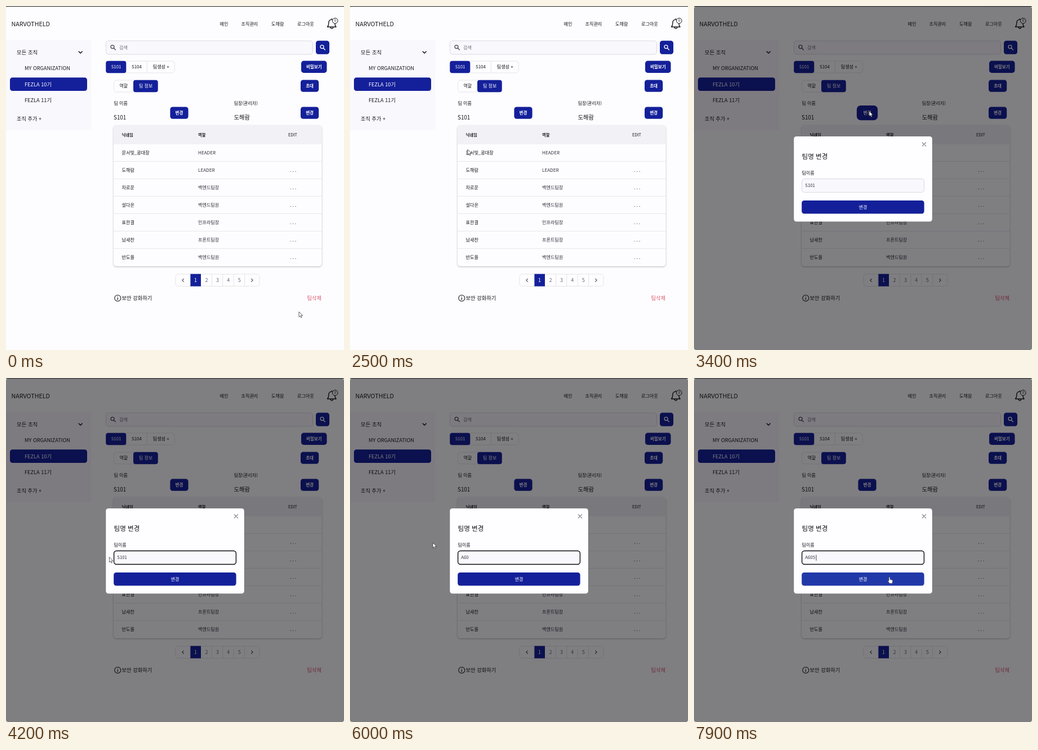
These frames come from a looping animation (600x612 px, 8000 ms). An HTML page:

```html
<!DOCTYPE html>
<html lang="ko">
<head>
<meta charset="utf-8">
<style>
html, body { margin: 0; width: 100%; height: 100%; overflow: hidden; background: #fdfdff; }
svg { display: block; width: 600px; height: 612px; font-family: "Noto Sans CJK KR", "Noto Sans KR", "Noto Sans", sans-serif; }
text { white-space: pre; }
</style>
</head>
<body>
<svg id="stage" viewBox="0 0 600 612"></svg>
<script>
const BLUE = '#14209a', HOVER = '#2139a8', INK = '#17171d', GRAY = '#6b6d7a', EDGE = '#e3e2e9';
const LOOP = 8000;

const text = (x, y, s, size = 8.1, fill = INK, extra = '') =>
  `<text x="${x}" y="${y}" font-size="${size}" fill="${fill}" ${extra}>${s}</text>`;
const mid = (x, y, s, size, fill, weight = 400) =>
  text(x, y, s, size, fill, `text-anchor="middle" font-weight="${weight}"`);
const box = (x, y, w, h, r, fill, extra = '') =>
  `<rect x="${x}" y="${y}" width="${w}" height="${h}" rx="${r}" fill="${fill}" ${extra}/>`;
const line = (d, color = INK, width = 1, extra = '') =>
  `<path d="${d}" fill="none" stroke="${color}" stroke-width="${width}" stroke-linecap="round" stroke-linejoin="round" ${extra}/>`;
const frame = (x, y, w, h, fill = 'none', color = EDGE) =>
  box(x, y, w, h, 4.5, fill, `stroke="${color}" stroke-width=".9"`);
const button = (x, y, w, s, extra = '') =>
  box(x, y, w, 21.3, 4.5, BLUE, extra) + mid(x + w / 2, y + 13.4, s, 7.5, '#fff', 700);
const lens = (x, y, color) =>
  line(`M${x + 2.2} ${y + 2.2}l3.2 3.2M${x + 3} ${y}a3 3 0 1 1-6 0a3 3 0 1 1 6 0`, color, 1.3);

function header() {
  const menu = [[379.5, '메인'], [417.5, '조직관리'], [471, '도해람'], [517, '로그아웃']];
  return box(0, 0, 600, 1.2, 0, '#3a3a3d') +
    text(9.5, 35.7, 'NARVOTHELD', 10.7, INK, 'font-weight="500"') +
    menu.map(([x, s]) => text(x, 35, s, 8.1)).join('') +
    line('M570.5 37.2h15.5c-1.6-1.8-2.2-3-2.2-6.5c0-4-2-6.6-5.5-6.6s-5.5 2.6-5.5 6.6c0 3.5-.7 4.7-2.3 6.5zM576 37.5c.4 3.4 4.4 3.4 4.8 0M578.3 24v-1.2', INK, 1.4) +
    '<circle cx="584.2" cy="26.3" r="4.8" fill="#fdfdff" stroke="#17171d"/>' +
    mid(584.2, 28.4, '0', 5.6, INK);
}

function sidebar() {
  return box(0, 61, 151.5, 160, 0, '#f9f8fd') +
    text(19, 85.7, '모든 조직', 9.4) +
    line('M129.2 81l3 3 3-3', INK, 1.6) +
    text(33, 114.2, 'MY ORGANIZATION', 9.2) +
    box(7, 127.3, 137, 23.7, 4.5, BLUE) +
    text(33, 142.5, 'FEZLA 10기', 9.2, '#fff') +
    text(33, 170.7, 'FEZLA 11기', 9.2) +
    text(19, 203.7, '조직 추가 +', 9.2);
}

function controls() {
  return frame(177.5, 62, 367, 24, '#f9f8fc', '#d6d5de') +
    lens(189, 72.6, '#484955') + text(201, 76.5, '검색', 8.1, GRAY) +
    box(550, 61.7, 24, 24, 4.5, BLUE) + lens(561, 72.6, '#fff') +
    frame(177.5, 98, 121.7, 21) + box(177.3, 97.7, 36, 21.5, 4, BLUE) + line('M250.5 98.5v20', EDGE, .9) +
    text(186.7, 111.3, 'S101', 7.8, '#fff') + text(223, 111.3, 'S104', 7.9) + text(260.7, 111.3, '팀생성 +', 8.1) +
    button(524, 97.6, 45.5, '비밀보기') +
    frame(191.5, 132, 78, 21) + box(226, 131.7, 43.7, 21.5, 4, BLUE) +
    text(201.5, 145.4, '역할', 8) + text(236, 145.4, '팀 정보', 8, '#fff', 'font-weight="500"') +
    button(523, 131.4, 32.2, '초대') +
    text(191.5, 176.3, '팀 이름', 8) + text(404.7, 176.3, '팀장(관리자)', 8) +
    text(191, 201.8, 'S101', 9.9) + text(404.7, 201.6, '도해람', 10.2) +
    button(291.4, 179.4, 32.2, '변경', 'id="rename"') + button(523, 179.4, 32.2, '변경');
}

function table() {
  const rows = [['문서빛_콩대장', 'HEADER'], ['도해람', 'LEADER'], ['차로운', '백엔드팀장'], ['설다온', '백엔드팀원'],
    ['표한결', '인프라팀장'], ['남새찬', '프론트팀장'], ['반도율', '백엔드팀원']];
  return box(191, 212.5, 369.5, 250.5, 5, '#fdfdff', 'style="filter:drop-shadow(0 1px 1.6px #0004)"') +
    '<path d="M191 246v-28.5a5 5 0 0 1 5-5h359.5a5 5 0 0 1 5 5v28.5z" fill="#f2f1f5"/>' +
    text(205.5, 231.7, '닉네임', 7.3, INK, 'font-weight="700"') +
    text(341, 231.7, '역할', 7.3, INK, 'font-weight="700"') +
    text(501, 231.9, 'EDIT', 7.4, INK, 'font-weight="500"') +
    rows.map(([name, role], i) => {
      const y = 264 + i * 31;
      return (i ? line(`M191 ${y - 18.5}h369.5`, '#e8e7ed', 1) : '') +
        text(205.5, y, name, 8.1) + text(341, y, role, 8.1, '#30313d') +
        (i ? text(504, y, '. . .', 8.1) : '');
    }).join('');
}

function footer() {
  return frame(301, 477, 149, 21.5) + box(327, 476.7, 19, 22, 0, BLUE) +
    [327, 365.3, 384.7, 404.1, 423.7].map(x => line(`M${x} 477.5v20.5`, EDGE, .9)).join('') +
    line('M315.3 485.3l-2.5 2.5 2.5 2.5M435.6 485.3l2.5 2.5-2.5 2.5', '#4c4d59', 1.2) +
    [1, 2, 3, 4, 5].map(n => mid(317.2 + n * 19.4, 491.1, n, 9, n > 1 ? GRAY : '#fff')).join('') +
    '<circle cx="198.3" cy="519.8" r="5.5" fill="none" stroke="#17171d" stroke-width="1.1"/>' +
    line('M198.3 519.2v3.4M198.3 516.9v.1', INK, 1.2) +
    text(205.5, 523.2, '보안 강화하기', 9.3) +
    text(534.5, 523.2, '팀삭제', 9.2, '#dc586c', 'font-weight="500"');
}

function dialog() {
  return '<g id="dialog">' + box(0, 1, 600, 611, 4, '#030005', 'opacity=".5"') +
    box(177.3, 232, 245.5, 151.5, 4.5, '#fefdff') +
    line('M405.3 242.8l6.4 6.4m0-6.4l-6.4 6.4', '#777985', 1.2) +
    text(191.5, 272.3, '팀명 변경', 11.6) + text(191.5, 299.5, '팀이름', 8) +
    box(191.6, 307.5, 216.8, 24, 4.5, '#f9f8fd', 'id="field"') +
    text(197.3, 322.4, '', 7.8, '#30313d', 'id="value"') +
    line('M217 315v9.5', INK, .8, 'id="caret"') +
    box(191.2, 346, 217.4, 23.5, 4.5, BLUE, 'id="save"') +
    mid(300, 360.6, '변경', 8, '#fff', 500) + '</g>';
}

function pointers() {
  return '<g id="pointer">' +
    '<path id="arrow" d="M0 0v9.2l2.1-1.9 1.6 3.2 1.5-.7-1.5-3.1h2.9z" fill="#fff" stroke="#222" stroke-width=".7"/>' +
    line('M-1.5-5h3M0-5v10M-1.5 5h3', '#222', .8, 'id="beam"') +
    '<path id="hand" d="M-1 1a1 1 0 0 1 2 0v3.4l3.7.9q1.2.4 1 1.8l-.8 4.4h-4.7l-3-4.2q-.2-1.3 1.8-.2z" fill="#fff" stroke="#333" stroke-width=".6"/></g>';
}

const stage = document.getElementById('stage');
stage.innerHTML = header() + sidebar() + controls() + table() + footer() + dialog() + pointers();
const $ = id => document.getElementById(id);
const show = (id, on) => $(id).setAttribute('visibility', on ? 'inherit' : 'hidden');

// time, x, y of the pointer tip
const path = [[0, 520, 544], [300, 520, 544], [1300, 154, 307], [1700, 154, 307], [2000, 138, 303], [2200, 142, 300],
  [2900, 311, 187], [3600, 311, 187], [4050, 222, 319], [4400, 125, 318], [4600, 125, 314], [4950, 147, 293],
  [6500, 147, 293], [7000, 181, 316], [7250, 215, 339], [7800, 347, 354], [8000, 347, 354]];

function pointerAt(t) {
  const i = path.findIndex(p => p[0] > t), [t0, x0, y0] = path[i - 1], [t1, x1, y1] = path[i];
  const u = (t - t0) / (t1 - t0), k = u * u * (3 - 2 * u);
  return [x0 + (x1 - x0) * k, y0 + (y1 - y0) * k];
}

function draw(now) {
  const t = now % LOOP, [x, y] = pointerAt(t);
  const open = t >= 3400, focused = t >= 4050;
  const within = (top, bottom) => open && x > 191 && x < 408.5 && y > top && y < bottom;
  const onField = within(307.5, 331.5), onSave = within(346, 369.5);

  const ring = $('rename');
  ring.setAttribute('stroke', t >= 3200 && !focused ? BLUE : 'none');
  ring.setAttribute('stroke-width', 5);

  show('dialog', open);
  $('field').setAttribute('stroke', focused ? '#0b0b10' : '#d6d5de');
  $('field').setAttribute('stroke-width', focused ? 1.4 : .9);
  const typed = [5600, 5850, 6100].filter(at => t >= at).length;
  $('value').textContent = t < 4700 ? 'S101' : 'A605'.slice(0, 1 + typed);
  show('caret', open && focused && t % 1000 >= 500);
  $('caret').setAttribute('transform', `translate(${t < 4700 ? 0 : (typed - 3) * 4.33})`);
  $('save').setAttribute('fill', onSave ? HOVER : BLUE);

  $('pointer').setAttribute('transform', `translate(${x} ${y})`);
  show('arrow', !onField && !onSave);
  show('beam', onField);
  show('hand', onSave);
}

const start = performance.now();
function tick() {
  draw(performance.now() - start);
  requestAnimationFrame(tick);
}
tick();
</script>
</body>
</html>
```
